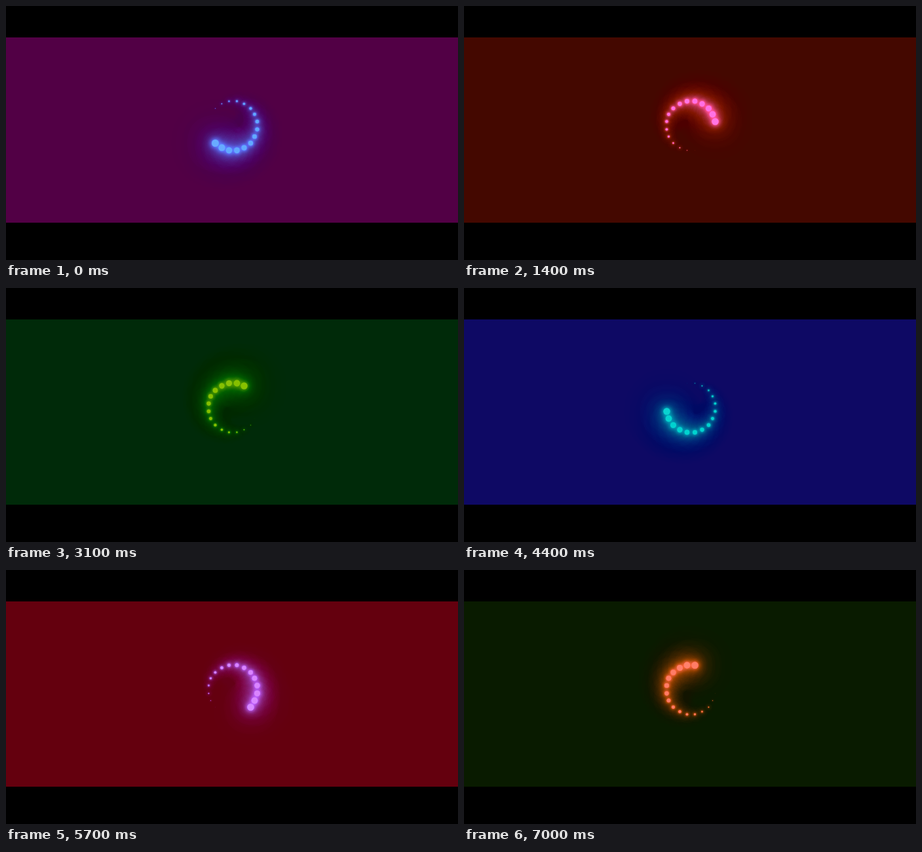
These frames come from a looping animation (690 by 388 pixels, 7100 ms). An HTML page:

```html
<!DOCTYPE html>
<html lang="en">
<head>
<meta charset="utf-8">
<title>Glowing dot loader</title>
<style>
  html, body { margin: 0; width: 100%; height: 100%; overflow: hidden; background: #000; }
  #band {
    position: absolute; left: 0; top: 47.5px; width: 690px; height: 283.5px;
    overflow: hidden; background: #110864;
  }
  .dot {
    --c: #0cd2d6;
    position: absolute; width: 10.8px; height: 10.8px; margin: -5.4px;
    border-radius: 50%; background: var(--c);
    box-shadow: 0 0 7.2px var(--c), 0 0 14.4px var(--c), 0 0 28.8px var(--c),
                0 0 43.2px var(--c), 0 0 57.6px var(--c), 0 0 72px var(--c);
  }
</style>
</head>
<body>
<div id="band"></div>
<script>
  const LOOP = 7100, STEP = 100;
  const COUNT = 20, FADE = 16;
  const CX = 346.25, CY = 135.25, RADIUS = 37.7;
  const band = document.getElementById('band');

  const dots = Array.from({ length: COUNT }, (_, k) => {
    const angle = (9 + k * 360 / COUNT) * Math.PI / 180;
    const dot = document.createElement('div');
    dot.className = 'dot';
    dot.style.left = CX + RADIUS * Math.sin(angle) + 'px';
    dot.style.top = CY - RADIUS * Math.cos(angle) + 'px';
    band.appendChild(dot);
    return dot;
  });

  // Position of the leading dot; it starts a little slowly, then advances one dot per step.
  const headAt = n => n + 10.75 + 1.35 * Math.exp(-n / 2);

  function draw(ms) {
    const head = headAt(Math.floor(ms % LOOP / STEP));
    dots.forEach((dot, k) => {
      const age = (head - k + COUNT * 10) % COUNT;
      dot.style.transform = `scale(${Math.max(0, 1 - age / FADE)})`;
    });
    band.style.filter = `hue-rotate(${7.2 * (head - 54.75) - 2}deg)`;
  }

  function tick() {
    draw(performance.now());
    requestAnimationFrame(tick);
  }
  tick();
</script>
</body>
</html>
```
